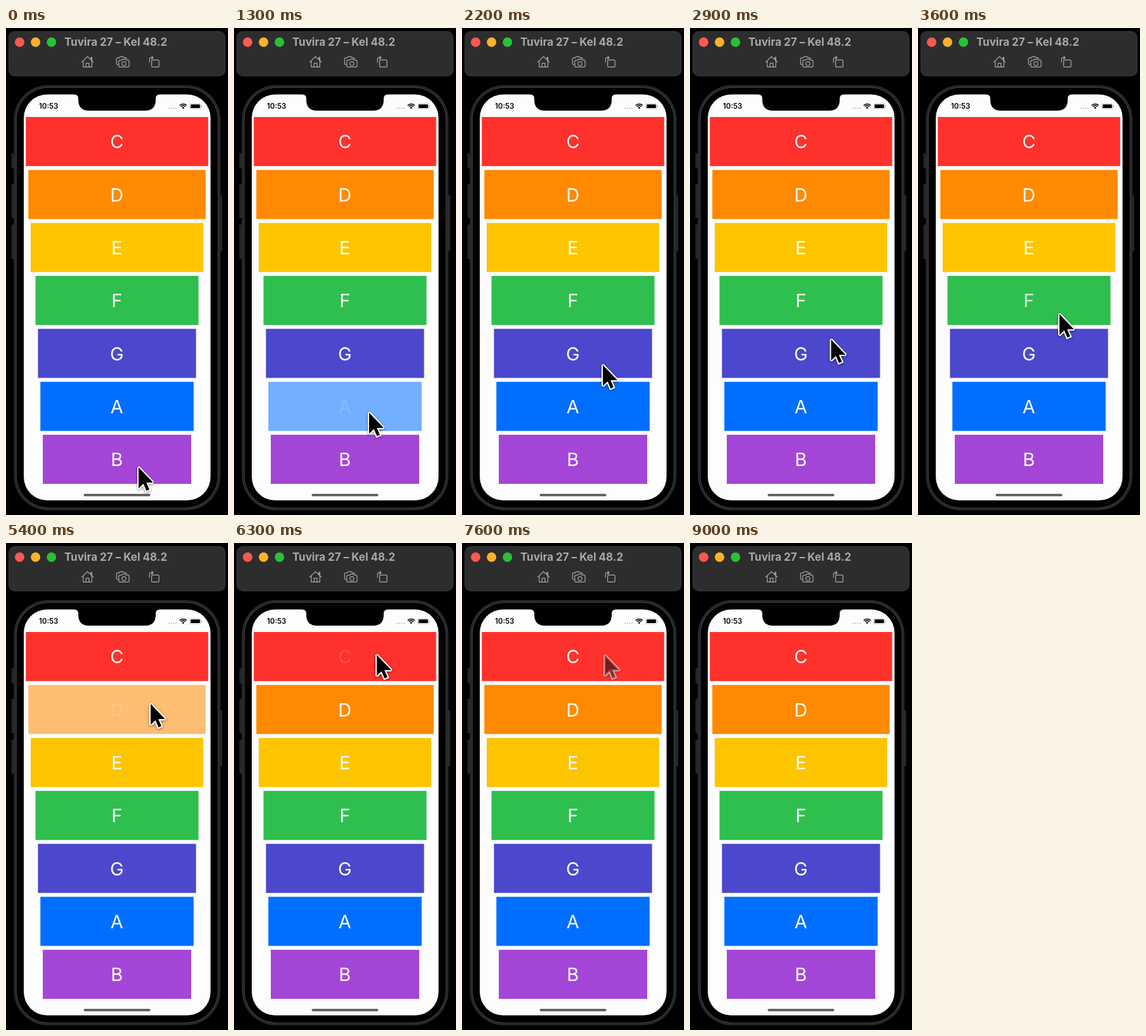
Write an HTML page with a canvas that moves like this. It is 350 px wide and 766 px high and loops after 9100 ms.

```html
<!DOCTYPE html>
<html lang="en">
<head>
<meta charset="utf-8">
<title>Xylophone</title>
<style>
  html, body { margin: 0; width: 100%; height: 100%; overflow: hidden; background: #000; }
  canvas { display: block; width: 350px; height: 766px; }
</style>
</head>
<body>
<canvas id="stage"></canvas>
<script>
const W = 350, H = 766, LOOP = 9100, STEP = 100;
const canvas = document.getElementById('stage');
const ctx = canvas.getContext('2d');
const ratio = window.devicePixelRatio || 1;
canvas.width = W * ratio;
canvas.height = H * ratio;

// note, colour, left inset, touch time, sound time (ms)
const bars = [
  ['C', '#ff312c', 31.3, 6300, 6400],
  ['D', '#ff8900', 35.2, 5300, 5400],
  ['E', '#fdc500', 39, 4300, 4400],
  ['F', '#2fbf4f', 46.5, 3400, 3400],
  ['G', '#4b48cd', 50.4, 2400, 2500],
  ['A', '#006fff', 54.2, 1300, 1300],
  ['B', '#a346d8', 58, 100, 200]
];
const BAR_TOP = 140, BAR_PITCH = 83.3, BAR_HEIGHT = 77.2;

// pointer moves: start, end, x, y
const moves = [
  [0, 0, 208, 689],
  [600, 1100, 212, 603],
  [1700, 2200, 221, 528],
  [2700, 3100, 222, 448],
  [3700, 4100, 227, 355],
  [4700, 5100, 227, 251],
  [5700, 6100, 224, 174]
];

const clamp = v => Math.max(0, Math.min(1, v));
const smooth = v => v * v * (3 - 2 * v);

function box(x, y, w, h, r, fill) {
  ctx.beginPath();
  ctx.roundRect(x, y, w, h, r);
  ctx.fillStyle = fill;
  ctx.fill();
}

function dot(x, y, r, fill) {
  ctx.beginPath();
  ctx.arc(x, y, r, 0, Math.PI * 2);
  ctx.fillStyle = fill;
  ctx.fill();
}

function line(path, color, width) {
  ctx.strokeStyle = color;
  ctx.lineWidth = width;
  ctx.stroke(new Path2D(path));
}

function label(text, x, y, font, color, align) {
  ctx.font = font + ' Inter, Roboto, sans-serif';
  ctx.fillStyle = color;
  ctx.textAlign = align;
  ctx.fillText(text, x, y);
}

function drawToolbar() {
  box(4, 5, 342, 71, 10, '#3b3b3b');
  box(4.7, 5.8, 340.6, 69.5, 9.5, '#2d2d2d');
  ['#fe5850', '#fdb22b', '#28c136'].forEach((c, i) => dot(21.5 + i * 25.1, 22.3, 7.5, c));
  label('Tuvira 27 – Kel 48.2', 92, 28, '700 17px', '#a9a9a9', 'left');

  const gray = '#a9a9a9';
  ctx.lineJoin = ctx.lineCap = 'round';
  line('M119.3 53.6L128.5 45L137.8 53.6M121.8 52V61.3H135.3V52M126.3 61V55.3H130.8V61M134 49.5V46.2H135.4V51', gray, 1.2);
  line('M177.5 57.5H176Q174.3 57.5 174.3 55.8V48.5Q174.3 46.8 176 46.8H178.5L180 45.2H185L186.5 46.8H188.5Q190.2 46.8 190.2 48.5', gray, 1.2);
  line('M179.5 50.7H182L183.3 49.2H188.6L190 50.7H192.3Q194 50.7 194 52.3V59.8Q194 61.4 192.3 61.4H179.5Q177.8 61.4 177.8 59.8V52.3Q177.8 50.7 179.5 50.7Z', gray, 1.2);
  line('M182.7 56A3.2 3.2 0 1 0 189.1 56A3.2 3.2 0 1 0 182.7 56', gray, 1.2);
  line('M231 50.3H239.8Q241.2 50.3 241.2 51.7V60Q241.2 61.4 239.8 61.4H231Q229.6 61.4 229.6 60V51.7Q229.6 50.3 231 50.3Z', gray, 1.2);
  line('M226.2 54V49.5Q226.2 46.7 229 46.7H231.5M229.6 44.4L232 46.7L229.6 49', gray, 1.2);
}

function drawPhone() {
  [[197, 24], [245, 54], [309, 54]].forEach(([y, h]) => box(8.5, y, 6, h, 1.5, '#242424'));
  box(336, 263, 5, 88, 1.5, '#242424');
  box(12.5, 90, 325.5, 668.5, 54, '#303030');
  box(14, 91.5, 322.5, 665.5, 52.5, '#191919');
  box(15.3, 92.8, 319.9, 662.9, 51.2, '#444');
  box(16.6, 94.1, 317.3, 660.3, 50, '#000');
  box(28, 104.5, 294.5, 638.5, 37, '#fdfdfd');
  ctx.fillStyle = '#000';
  ctx.fill(new Path2D('M108 104H242V104.5Q236 105 236 111V113Q236 130 219 130H131Q114 130 114 113V111Q114 105 108 104.5Z'));
}

function drawStatus() {
  label('10:53', 67.2, 127.2, '600 11.5px', '#000', 'center');
  for (let i = 0; i < 4; i++) dot(257.2 + i * 3.6, 126.2, 1, '#b8b8b8');
  ctx.lineCap = 'butt';
  [7.5, 4.8].forEach(r => {
    ctx.beginPath();
    ctx.arc(279.3, 127, r, -Math.PI * .76, -Math.PI * .24);
    ctx.strokeStyle = '#000';
    ctx.lineWidth = 1.7;
    ctx.stroke();
  });
  ctx.fillStyle = '#000';
  ctx.fill(new Path2D('M279.3 127.4L277.2 125Q279.3 123.4 281.4 125Z'));
  box(289.5, 118.8, 17.8, 8.8, 2.6, '#aaa');
  box(290.2, 119.5, 16.4, 7.4, 2, '#fdfdfd');
  box(291, 120.3, 14.8, 5.8, 1.4, '#000');
  box(307.9, 121.7, 1.1, 3, .6, '#aaa');
}

// The title dims while touched, then brightens after the sound starts.
function titleAlpha(t, touch, sound) {
  if (t < touch) return 1;
  return .14 + .86 * smooth(clamp((t - sound) / 300));
}

function drawBars(t) {
  bars.forEach(([note, color, x, touch, sound], i) => {
    const y = BAR_TOP + i * BAR_PITCH;
    ctx.globalAlpha = t >= sound && t < sound + 200 ? .55 : 1;
    ctx.fillStyle = color;
    ctx.fillRect(x, y, W - 2 * x, BAR_HEIGHT);
    ctx.globalAlpha = titleAlpha(t, touch, sound);
    label(note, 174.8, y + 49.3, '400 29px', '#fff', 'center');
    ctx.globalAlpha = 1;
  });
}

const arrow = new Path2D('M0 0V33L7.6 25.7L12.4 37L17 35L12.2 24H23Z');

function drawPointer(t) {
  if (t >= 7700) return;
  let x = 0, y = 0;
  moves.forEach(([start, end, mx, my]) => {
    if (t < start) return;
    const k = end > start ? smooth(clamp((t - start) / (end - start))) : 1;
    x += (mx - x) * k;
    y += (my - y) * k;
  });
  ctx.save();
  ctx.translate(x + 1, y + 2);
  ctx.globalAlpha = t >= 7600 ? .5 : 1;
  ctx.lineJoin = 'miter';
  ctx.save();
  ctx.shadowColor = 'rgba(0,0,0,.4)';
  ctx.shadowBlur = 4 * ratio;
  ctx.shadowOffsetY = 1.5 * ratio;
  ctx.strokeStyle = '#fff';
  ctx.lineWidth = 4;
  ctx.miterLimit = 2;
  ctx.stroke(arrow);
  ctx.restore();
  ctx.fillStyle = '#000';
  ctx.fill(arrow);
  ctx.restore();
}

function draw(now) {
  const t = Math.floor((now % LOOP) / STEP) * STEP;
  ctx.setTransform(ratio, 0, 0, ratio, 0, 0);
  ctx.fillStyle = '#000';
  ctx.fillRect(0, 0, W, H);
  drawToolbar();
  drawPhone();
  drawStatus();
  drawBars(t);
  box(122.5, 732.8, 105, 3.7, 1.8, '#5a5a5a');
  drawPointer(t);
}

const began = performance.now();
function tick() {
  draw(performance.now() - began);
  requestAnimationFrame(tick);
}
tick();
</script>
</body>
</html>
```
